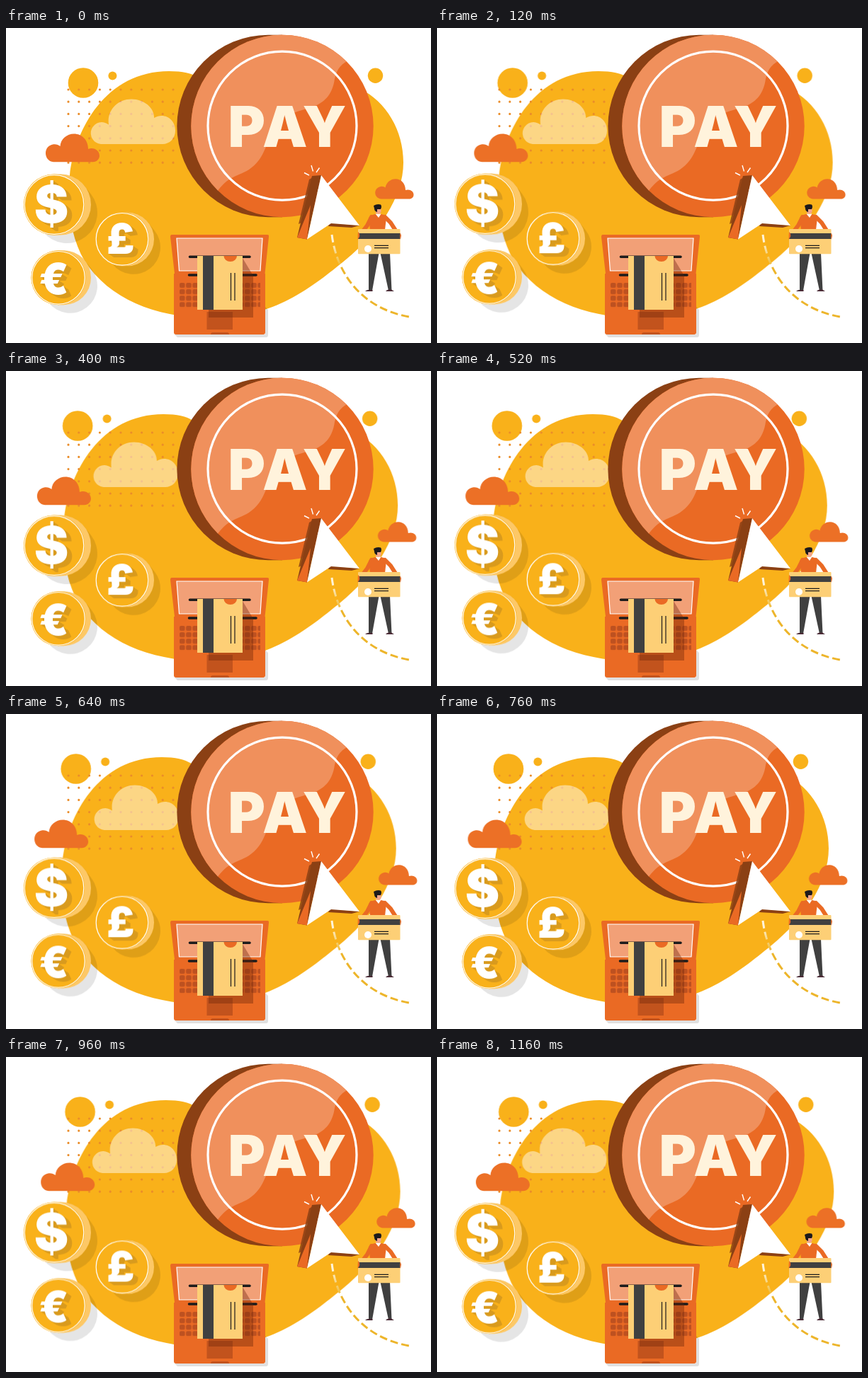
These frames come from a looping animation (600 px wide and 445 px high, 1200 ms). An HTML page:

```html
<!DOCTYPE html>
<html lang="en">
<head>
<meta charset="utf-8">
<title>Pay</title>
<style>
  html, body { margin: 0; width: 100%; height: 100%; overflow: hidden; background: #fff; }
  svg { display: block; width: 600px; height: 445px; }
  text { font-family: Inter, "Open Sans", sans-serif; font-weight: 900; }
  .gold { fill: #f9b11a; }
  .orange { fill: #ea6a24; }
  .cloud { fill: #ec7026; }
  .brown { fill: #8b4014; }
  .card { fill: #fdcf76; }
  .dark { fill: #404040; }
  .line { fill: none; stroke: #fff; }
  .ink { fill: none; stroke: #1c1c1c; stroke-width: 1.2; }
  .arm { fill: none; stroke: #ea6a24; stroke-width: 6; stroke-linecap: round; stroke-linejoin: round; }
  .dots { fill: none; stroke: #ea8d2a; stroke-width: 3.2; stroke-linecap: round; stroke-dasharray: 0 14.8; }
  .move { animation: drift 1200ms infinite; }
  .left { --dx: -11px; }
  .far { --dx: -17px; }
  .right { --dx: 5.2px; }
  .up { --dy: -4px; }
  /* out over 560 ms, a short rest, back over 600 ms */
  @keyframes drift {
    0% { transform: translate(0, 0); animation-timing-function: steps(14); }
    46.66% { transform: translate(var(--dx, 0), var(--dy, 0)); }
    49.99% { transform: translate(var(--dx, 0), var(--dy, 0)); animation-timing-function: steps(15); }
    100% { transform: translate(0, 0); }
  }
</style>
</head>
<body>
<svg viewBox="0 0 600 445" xmlns="http://www.w3.org/2000/svg">
  <defs>
    <pattern id="keys" x="245" y="360" width="9.2" height="9.1" patternUnits="userSpaceOnUse">
      <rect width="7.6" height="7" rx="2" fill="#bd5120"/>
    </pattern>
    <linearGradient id="fade" gradientUnits="userSpaceOnUse" x1="0" y1="300" x2="0" y2="338">
      <stop stop-color="#fff4da"/>
      <stop offset="1" stop-color="#edb52b"/>
    </linearGradient>
    <clipPath id="face"><circle cx="390" cy="138.500" r="128.700"/></clipPath>
  </defs>

  <g class="gold move left">
    <path d="M230 61C250 61 262 64 272 70L500 86C537 104 561 145 561 190C561 240 525 290 480 327C432 366 378 411 285 410C210 408 146 383 111 329C92 297 85 252 90 208C97 143 141 61 230 61Z"/>
    <circle cx="109" cy="77.500" r="21.300"/>
    <circle cx="150.400" cy="67.500" r="6"/>
    <circle cx="521.500" cy="67.300" r="10.700"/>
  </g>

  <path class="dots" d="M88 87H237M88 104.200H237M88 121.400H237M88 138.600H237M88 155.800H237M88 173H237M88 190.200H237"/>

  <path class="move right" fill="#fff" fill-opacity=".47"
    d="M134 164A15.500 15.500 0 1 1 145 136.500C142 116 158 100.500 177 100.500C196 100.500 210 114 209 127C223 119 239 128 239 145C239 156 231 164 221 164Z"/>
  <path class="cloud move far"
    d="M67 189.300C53 188 52 167 66 164.500C70 163.500 74 165 76.500 167C77 157 86 149.500 96 149.500C107 149.500 116 158 116 171C124 168 132 173 132 180.500C132 185 128 189.300 123 189.300Z"/>
  <path class="cloud move right"
    d="M530 241.500C519 241 518 226 529 224C532 223.500 534 224.500 535.500 225.500C537 218 543 213.300 550 213.300C558 213.300 564 220 564 229C570 227 575.500 230.500 575.500 235.500C575.500 239 573 241.500 569 241.500Z"/>

  <g id="coins"></g>

  <!-- pay button -->
  <path class="brown" d="M370 9.800H390V267.200H370A128.700 128.700 0 0 1 370 9.800Z"/>
  <circle class="orange" cx="390" cy="138.500" r="128.700"/>
  <path clip-path="url(#face)" fill="#f0905c"
    d="M250 0H470L488 45C474 48 467 58 464 72C461 92 452 104 434 111C412 119 386 121 376 145C366 167 364 186 343 200C325 211 314 208 296 234L250 260Z"/>
  <circle class="line" cx="390" cy="138.200" r="105" stroke-width="3.200"/>
  <text x="313.500 362 418.500" y="168" font-size="80" fill="#fff3dc">PAY</text>

  <!-- pointer -->
  <path fill="#8b4014" fill-opacity=".85" d="M428 214L436 209L424 272L413 277Z"/>
  <path class="brown" d="M432 209L445 208L425 298.500L411 296Z"/>
  <path class="orange" d="M411 296L430 250L425 298.500Z"/>
  <path class="brown" d="M457 275L499 279L488 282L455 280Z"/>
  <path fill="#fff" d="M445 208L499 279L459 276L425 298.500Z"/>
  <path class="line" stroke-width="1.400" d="M421 204.500L428 208M431 194L433.500 202.500M442.500 197.500L438 204"/>
  <path fill="none" stroke="url(#fade)" stroke-width="3" stroke-dasharray="11 5" d="M460 292C467 347 502 396 569 408"/>

  <!-- laptop -->
  <path fill="#000" fill-opacity=".12" d="M366 394L370 398V434Q370 437 367 437H242L238 433H366Z"/>
  <path class="orange" d="M234 292H369Q371.500 292 371 295L365.500 347H238L232 295Q232 292 234 292Z"/>
  <path fill="#f2a077" stroke="#fff" stroke-width="1.200" d="M241 297H362L359 343H244.500Z"/>
  <path class="orange" d="M237 347H366V430Q366 433 363 433H240Q237 433 237 430Z"/>
  <rect x="245" y="360" width="26" height="34.300" fill="url(#keys)"/>
  <rect x="332" y="360" width="27" height="34.300" fill="url(#keys)"/>
  <rect x="283.500" y="401" width="36.500" height="25" fill="#c2531d"/>
  <path fill="#c2531d" d="M289 433Q289 430 292 430H312Q315 430 315 433Z"/>
  <path fill="none" stroke="#1c1c1c" stroke-width="3.600" stroke-linecap="round" d="M259.500 323.300H344M258.500 349H353"/>
  <path fill="#6b2408" fill-opacity=".38" d="M334 325L349 350V409H286V398H334Z"/>
  <rect class="card" x="270" y="322" width="64" height="76"/>
  <rect class="dark" x="278" y="322" width="15" height="76"/>
  <path class="orange" d="M307.500 322H326A9.200 8 0 0 1 307.500 322Z"/>
  <path class="ink" d="M317.500 346V385M323 346V385"/>

  <!-- man with card -->
  <path class="dark" d="M512 318H526.500L517 371H512ZM528.500 318H542L544.500 371H540Z"/>
  <path fill="#4a2a35" d="M507 372Q509.500 369.500 512 370H517.500V372ZM536 372Q537 370 540 369.500H544L548 372Z"/>
  <path class="orange" d="M517 264Q525 261.500 534 264L537 268L535 285H514L512 268Z"/>
  <path class="arm" d="M516 267L510 279L500 292M535 267L543 275L554.500 293"/>
  <path fill="#fff" d="M521.500 262.500H529.500L526 268Z"/>
  <path fill="#f4a58a" d="M522 255H529.500V260Q527 265 522 261Z"/>
  <path fill="#1d1a1c" d="M519 251Q524 248 529 249.500Q531 252 529 256H524V260Q520 259 520 255Z"/>
  <rect class="card" x="497" y="284" width="59.500" height="35.200" rx="1"/>
  <rect class="dark" x="497" y="290" width="59.500" height="8"/>
  <circle cx="511" cy="312" r="5" fill="#fff"/>
  <path class="ink" d="M520 307.300H540M520 310.700H540"/>
  <path class="orange" d="M497 288Q500 290 499 295L496.500 299ZM556.500 289Q559 294 556.500 299Z"/>
</svg>
<script>
  // x, y, radius, edge depth, sign, sign x, baseline, size
  const coins = [
    [68, 249.5, 43, 9, "$", 64, 275, 73],
    [74, 352.8, 38.5, 7.5, "€", 67.5, 376, 60],
    [164, 298.3, 38, 7, "£", 161.7, 319, 59]
  ];

  const bar = (x, y, dx, dy, r, color) =>
    `<path d="M${x} ${y}l${dx} ${dy}" stroke="${color}" stroke-width="${2 * r}" stroke-linecap="round"/>`;

  const coin = ([x, y, r, depth, sign, sx, sy, size]) => {
    const glyph = (n, color) =>
      `<text x="${sx + n}" y="${sy + n * 0.7}" font-size="${size}" text-anchor="middle" fill="${color}">${sign}</text>`;
    const shade = [7, 5.5, 4, 2.5, 1].map(n => glyph(n, "#d99b1e")).join("");
    return `<g class="move up">
      ${bar(x + depth, y, 9, 11.5, r, "rgba(0,0,0,.1)")}
      ${bar(x, y, depth, 0, r, "#fdc866")}
      <circle class="gold" cx="${x}" cy="${y}" r="${r}"/>
      <circle class="line" cx="${x}" cy="${y}" r="${r - 1.2}" stroke-width="1.2"/>
      ${shade}${glyph(0, "#fff")}
    </g>`;
  };

  document.getElementById("coins").innerHTML = coins.map(coin).join("");
</script>
</body>
</html>
```
